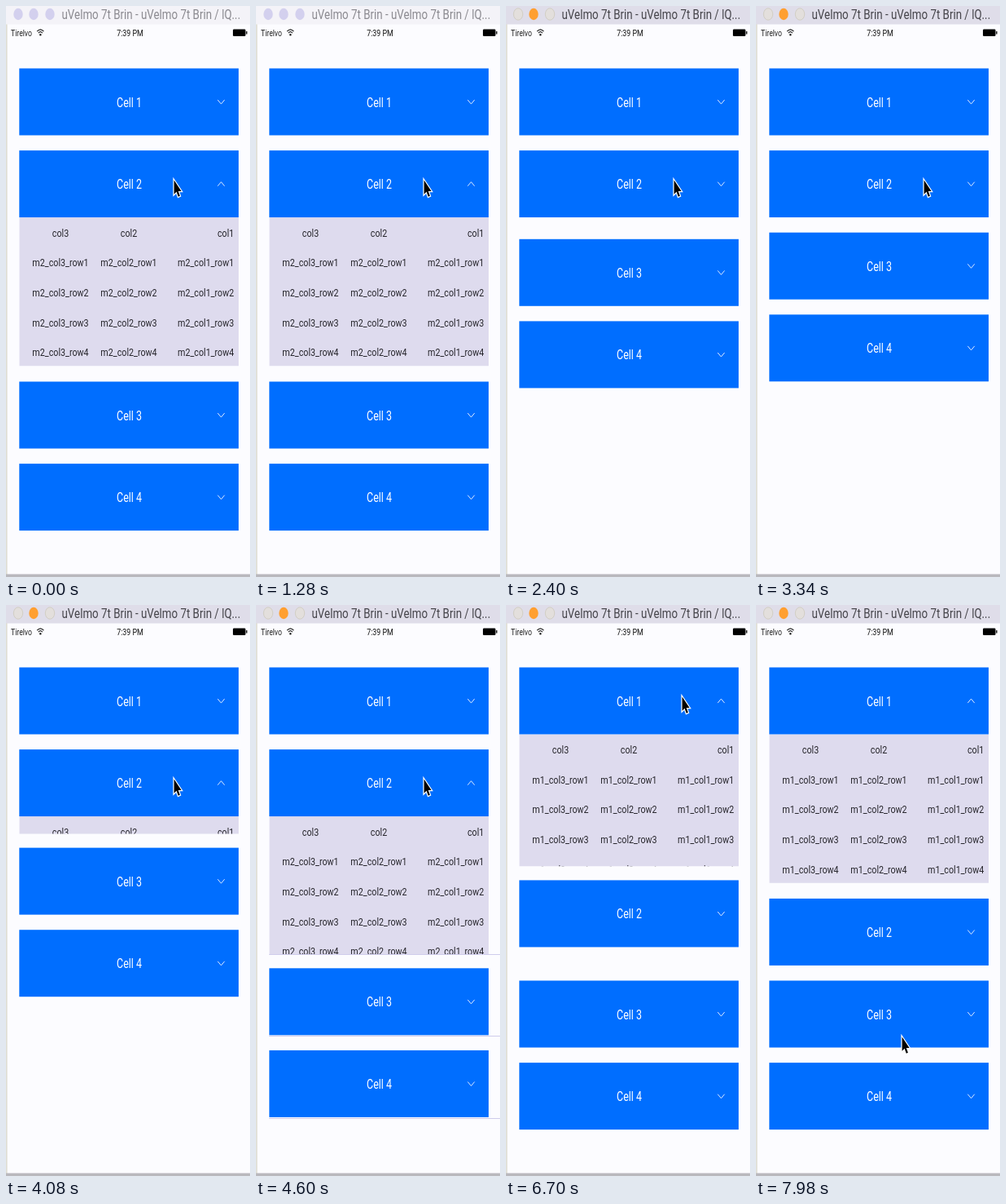
An HTML page for the animation above (8 s loop, 300 by 700 pixels).

```html
<!DOCTYPE html>
<html lang="en">
<head>
<meta charset="utf-8">
<title>Expandable cells</title>
<style>
  html, body { margin: 0; width: 100%; height: 100%; overflow: hidden; background: #fcfcff; }
  svg { display: block; }
  text { font-family: Roboto, "Open Sans", sans-serif; }
</style>
</head>
<body>
<svg id="stage" width="300" height="700" viewBox="0 0 300 700"></svg>
<script>
const LOOP = 8000;
const BODY = 182.8, PITCH = 100.6, TOP = 76.5;
const NARROW = 0.79; // the whole screen is shown slightly condensed
const stage = document.getElementById('stage');

function add(parent, tag, attrs) {
  const node = document.createElementNS('http://www.w3.org/2000/svg', tag);
  for (const key in attrs) node.setAttribute(key, attrs[key]);
  return parent.appendChild(node);
}

function label(parent, str, x, y, size, fill, anchor = 'middle') {
  const node = add(parent, 'text', {
    transform: `translate(${x} ${y}) scale(${NARROW} 1)`,
    'font-size': size, fill, 'text-anchor': anchor
  });
  node.textContent = str;
  return node;
}

function rect(parent, x, y, width, height, fill) {
  return add(parent, 'rect', { x, y, width, height, fill });
}

// Window
rect(stage, 0, 0, 300, 700, '#fcfcff');
rect(stage, 0, 22, 1.6, 678, '#deddd2');
rect(stage, 0, 696.5, 300, 3.5, '#b9b8bd');
const bar = rect(stage, 0, 0, 300, 22.5, '#f4f3f8');
const lights = [15, 34, 54].map(cx => add(stage, 'ellipse', { cx, cy: 10, rx: 5.7, ry: 7.2 }));
const title = label(stage, 'uVelmo 7t Brin - uVelmo 7t Brin / lQ...', 68.5, 16, 16.9, '#888', 'start');

// Status bar
label(stage, 'Tirelvo', 6, 37, 11, '#222', 'start');
label(stage, '7:39 PM', 152.5, 37, 11.2, '#111');
add(stage, 'path', {
  d: 'M38.2 31.2Q42.3 26.6 46.4 31.2M39.8 33.1Q42.3 30.3 44.8 33.1',
  fill: 'none', stroke: '#222', 'stroke-width': 1.2
});
add(stage, 'circle', { cx: 42.3, cy: 35.2, r: 1.2, fill: '#222' });
add(stage, 'rect', { x: 279, y: 28.5, width: 15.5, height: 8.5, rx: 1.2, fill: '#000' });
rect(stage, 295.2, 31, 1.3, 3.5, '#000');

// Cells
function makeBody(parent, n) {
  const body = add(parent, 'svg', { x: 16.3, y: 82, width: 269.7, height: 0, overflow: 'hidden' });
  rect(body, 0, 0, 269.7, 183, '#dedbee');
  const columns = [['col3', 50.7, 'middle'], ['col2', 134.7, 'middle'], ['col1', 264, 'end']];
  for (let row = 0; row < 5; row++) {
    for (const [col, x, anchor] of columns) {
      const str = row ? `m${n}_${col}_row${row}` : col;
      label(body, str, x, 23.6 + row * 36.6, 13.6, '#26252b', anchor);
    }
  }
  return body;
}

function makeCell(n) {
  const group = add(stage, 'g', {});
  const body = n < 3 ? makeBody(group, n) : null;
  rect(group, 16.3, 0, 269.7, 82, '#006eff');
  label(group, 'Cell ' + n, 151.5, 47, 15.8, '#fff');
  const chevron = add(group, 'path', { fill: 'none', stroke: '#dcebff', 'stroke-width': 1 });
  return { group, body, chevron };
}

const cells = [1, 2, 3, 4].map(makeCell);
const separators = [0, 1, 2].map(() => rect(stage, 16, 0, 284, 1, '#cfccec'));
const pointer = add(stage, 'path', {
  d: 'M0.6 0.6V17.8L3.6 14.8L5.8 20.8L7.9 19.8L5.8 14.1H9.6Z',
  fill: '#000', stroke: '#fff', 'stroke-width': 2.4, 'paint-order': 'stroke'
});

// Screen steps come in groups of three lasting 100, 20 and 20 ms.
function stepAt(ms) {
  const t = ms - 20;
  const cycle = Math.floor(t / 140);
  const rest = t - cycle * 140;
  return cycle * 3 + (rest < 100 ? 0 : rest < 120 ? 1 : 2);
}

// Equivalent of cubic-bezier(.42, 0, .58, 1)
function easeInOut(u) {
  if (u <= 0) return 0;
  if (u >= 1) return 1;
  let lo = 0, hi = 1;
  for (let i = 0; i < 24; i++) {
    const s = (lo + hi) / 2, r = 1 - s;
    if (1.26 * s * r * r + 1.74 * s * s * r + s * s * s < u) lo = s; else hi = s;
  }
  return lo * lo * (3 - 2 * lo);
}

const ramp = (step, start, length) => easeInOut((step - start) / length);

const CLICK = 36, COLLAPSE = 36.95, EXPAND = 82.95, SWITCH = 129;

function pointerAt(step) {
  const up = ramp(step, 115, 10), down = ramp(step, 149, 13);
  return [206 + 10 * up - 37 * down, 213 - 101 * up + 417 * down];
}

function placeCell(i, y, expanded, open) {
  const { group, body, chevron } = cells[i];
  group.setAttribute('transform', `translate(0 ${y})`);
  chevron.setAttribute('d', expanded ? 'M260.3 43.6L264.5 38.6L268.7 43.6' : 'M260.3 38.6L264.5 43.6L268.7 38.6');
  if (body) body.setAttribute('height', expanded && open > 0 ? Math.min(182.2, open * BODY + 1.4) : 0);
}

function draw(ms) {
  const step = stepAt(ms);
  const swap = ramp(step, SWITCH, 17.2);
  const open2 = 1 - ramp(step, COLLAPSE, 16.5) + ramp(step, EXPAND, 17.6) - swap;
  const third = TOP + 2 * PITCH + BODY * (swap + open2);

  placeCell(0, TOP, step >= SWITCH, swap);
  placeCell(1, TOP + PITCH + BODY * swap, step < CLICK || (step >= EXPAND && step < SWITCH), open2);
  placeCell(2, third, false, 0);
  placeCell(3, third + PITCH, false, 0);

  const moving = open2 > 0.82 && open2 < 0.985 && step < SWITCH;
  separators.forEach((line, i) => {
    line.setAttribute('y', Math.round(third - 17.6 + i * PITCH));
    line.setAttribute('visibility', moving && (i < 2 || step > EXPAND) ? 'visible' : 'hidden');
  });

  const active = step >= CLICK;
  bar.setAttribute('fill', active ? '#dfdde9' : '#f4f3f8');
  title.setAttribute('fill', active ? '#45444a' : '#8b8a90');
  lights.forEach((light, i) => {
    light.setAttribute('fill', !active ? '#d3d0ee' : i === 1 ? '#ff9f30' : '#e3dfdc');
    light.setAttribute('stroke', active && i !== 1 ? '#d2cec4' : 'none');
  });

  pointer.setAttribute('transform', `translate(${pointerAt(step).join(' ')})`);
}

function tick() {
  draw(performance.now() % LOOP);
  requestAnimationFrame(tick);
}
tick();
</script>
</body>
</html>
```
